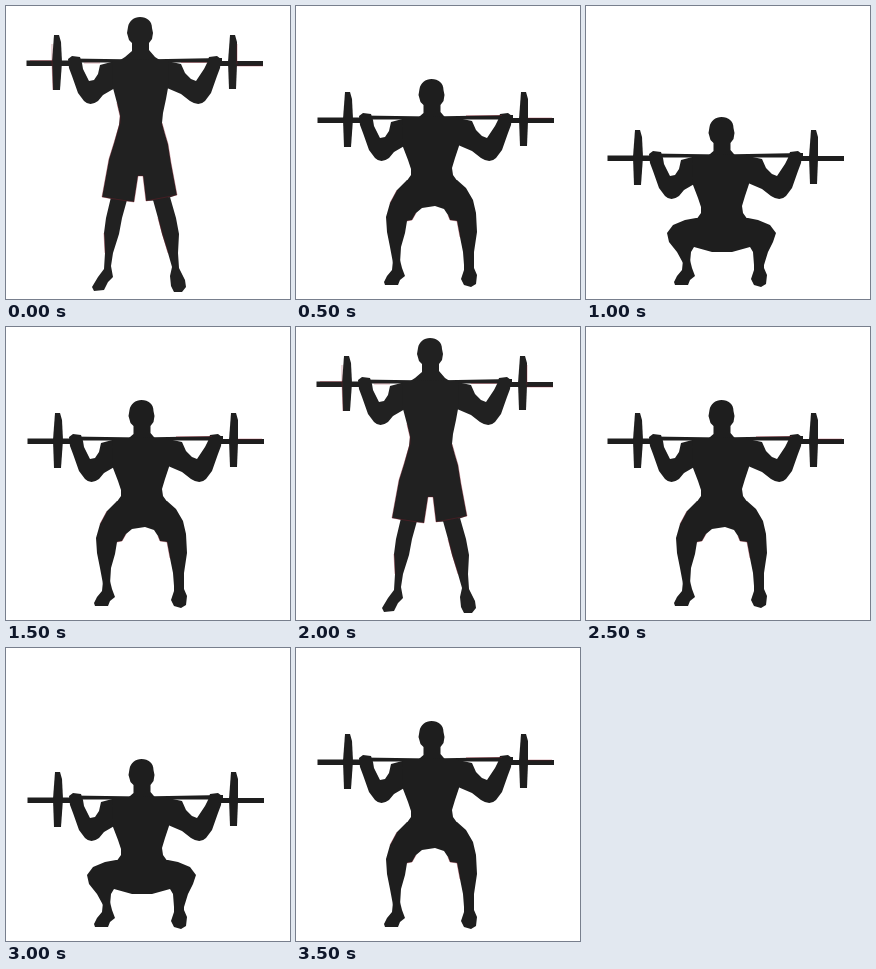
Animation of 284 by 293 pixels, one loop 4000 ms. Source, as an HTML page:

```html
<!DOCTYPE html>
<html lang="en">
<head>
<meta charset="utf-8">
<title>Barbell squat</title>
<style>
  html, body { margin: 0; width: 100%; height: 100%; overflow: hidden; background: #fff; }
  svg { display: block; width: 284px; height: 293px; }
  .pose { visibility: hidden; fill: #1e1e1e; }
  .stand { fill: #212121; }
  .edge { fill: none; stroke: #8a1c2a; stroke-width: .5; opacity: .7; }
</style>
</head>
<body>
<svg viewBox="0 0 284 293">
  <defs>
    <path id="head" d="M134 11C141 11 146 15 146 22L147 27L146 33L143 37V44L149 51L160 58H108L119 51L126 45V37L123 34L121 27L122 21C123 15 128 11 134 11Z"/>
    <g id="bar">
      <path d="M20.500 54.500H66V60H20.500ZM64 52.500L134 53.500L216 52V56.500H64ZM210 55H257V60H210Z"/>
      <path d="M48 29H53L55 36L56 56L54 84H47L46 56Z"/>
      <path d="M224 29H229L231 36V58L230 83H223L222 56Z"/>
    </g>
    <g id="arms">
      <path d="M62 53L66 50L74 51L76 57L77 63L83 75L88 74L92 68L94 59L109 55V82L97 89L92 95Q84 101 78 95L72 87L66 70L63 62Z"/>
      <path d="M215 53L211 50L203 51L201 57L198 63L190 75L185 73L179 67L175 58L161 55V82L175 88L184 95Q193 101 199 95L205 87L211 70L214 62Z"/>
    </g>
    <g id="squat">
      <use href="#head" x="1.500" y="62"/>
      <use href="#bar" x="1" y="57"/>
      <use href="#arms" x="1" y="57"/>
      <path d="M106 113H163V140L159 152L156 162L157 169L162 176H110L115 169V163L112 154L107 141Z"/>
    </g>
    <g id="feet">
      <path d="M97 254H104L106 262L109 270L104 274L102 279H89L88 276L91 270L96 264Z"/>
      <path d="M168 256H178V262L181 269L180 278L175 281L168 279L165 273L168 264Z"/>
    </g>
  </defs>

  <g class="pose stand">
    <use href="#head"/>
    <use href="#bar"/>
    <use href="#arms"/>
    <path d="M106 55H163L162 82L160 93L157 107L156 117L159 128L162 138L165 157L171 189L156 194L140 195L137 170H132L128 196L111 194L96 191L103 153L108 137L113 119L114 110L111 97L107 82Z"/>
    <path d="M105 191L121 194L116 212L113 228L107 247L105 260L107 271L102 276L98 284L88 285L86 281L92 271L98 263L99 247L98 227L100 212Z"/>
    <path d="M147 194L164 191L170 212L173 228L172 247L173 262L179 274L180 281L176 286H168L165 280L164 270L166 261L162 247L156 228L152 212Z"/>
    <path class="edge" d="M24 54.500H46M231 60H257M46 38V56L47 84M231 38V58M78 57H94M175 56.500H201M111 97L114 110V117L108 137L103 153L96 191L128 196L132 170H137L140 195L171 189L165 157L162 138L156 117M98 227L99 247M152 212L162 247"/>
  </g>

  <g class="pose">
    <use href="#squat"/>
    <use href="#feet"/>
    <path d="M111 174H161L170 182L177 194L180 207L181 226L178 246V259H168L167 246L164 231L161 215L154 214L152 209L148 203L139 200L126 202L120 207L116 214L111 215L109 227L105 241L104 257H97L94 241L91 226L90 211L94 197L101 184Z"/>
    <path class="edge" d="M170 109.500H206M232 112H256M94 197L101 184M111 215L116 214L120 207M152 209L154 214L161 215L164 231"/>
  </g>

  <g class="pose">
    <use href="#squat" y="38"/>
    <use href="#feet"/>
    <path d="M110 212H162L172 214L184 219L190 227L187 236L182 246L178 259H168L167 246L164 241L146 246H126L108 241L105 246L104 257H97L91 246L83 236L81 227L87 219L99 214Z"/>
  </g>
</svg>
<script>
  const poses = document.querySelectorAll('.pose');
  const order = [0, 1, 2, 1];
  const step = 500;
  const start = performance.now();

  function draw(now) {
    const beat = Math.floor(Math.max(0, now - start) / step) % order.length;
    poses.forEach((pose, i) => {
      pose.style.visibility = i === order[beat] ? 'visible' : 'hidden';
    });
    requestAnimationFrame(draw);
  }
  draw(start);
</script>
</body>
</html>
```
